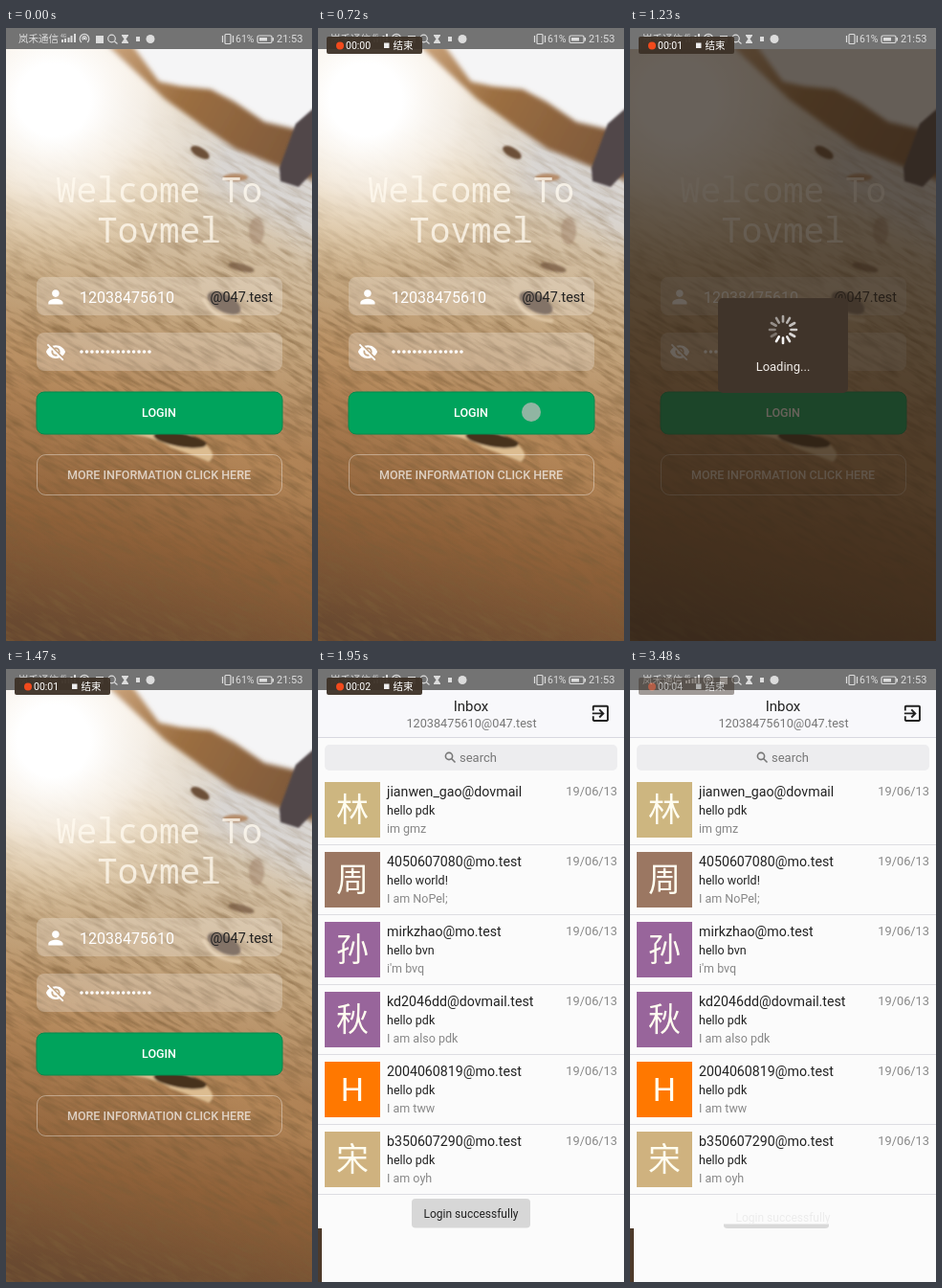
These frames come from a looping animation (320x640 px, 3.51 s). An HTML page:

```html
<!DOCTYPE html>
<html lang="en">
<head>
<meta charset="utf-8">
<title>Mail login</title>
<style>
  html, body { margin: 0; width: 100%; height: 100%; overflow: hidden; background: #fafafa; }
  svg { display: block; width: 320px; height: 640px; font-family: Roboto, "Noto Sans CJK SC", "Noto Sans CJK", sans-serif; }
  .mid { text-anchor: middle; }
  .end { text-anchor: end; }
  .mono { font-family: "Noto Sans Mono", monospace; }
</style>
</head>
<body>
<svg viewBox="0 0 320 640">
  <defs>
    <linearGradient id="sand" gradientUnits="userSpaceOnUse" x1="220" y1="70" x2="90" y2="640">
      <stop offset="0" stop-color="#e6e0da"/>
      <stop offset=".2" stop-color="#d8c8b0"/>
      <stop offset=".4" stop-color="#c5a780"/>
      <stop offset=".6" stop-color="#ad8054"/>
      <stop offset=".8" stop-color="#8f6139"/>
      <stop offset="1" stop-color="#694930"/>
    </linearGradient>
    <linearGradient id="hill" gradientUnits="userSpaceOnUse" x1="110" y1="22" x2="300" y2="130">
      <stop offset="0" stop-color="#c9a27a"/>
      <stop offset=".4" stop-color="#9c6f42"/>
      <stop offset="1" stop-color="#805a3a"/>
    </linearGradient>
    <radialGradient id="glare" gradientUnits="userSpaceOnUse" cx="50" cy="75" r="190">
      <stop offset=".2" stop-color="#fff"/>
      <stop offset=".5" stop-color="#fdf6ec" stop-opacity=".75"/>
      <stop offset="1" stop-color="#f6dcb0" stop-opacity="0"/>
    </radialGradient>
    <linearGradient id="grainFade" x2="0" y2="1">
      <stop offset=".1" stop-color="#000"/>
      <stop offset=".5" stop-color="#fff"/>
    </linearGradient>
    <mask id="ground"><rect width="320" height="640" fill="url(#grainFade)"/></mask>
    <filter id="grain" x="0" y="0" width="100%" height="100%">
      <feTurbulence type="fractalNoise" baseFrequency=".035 .22" numOctaves="3" seed="4"/>
      <feColorMatrix values="0 0 0 0 .2  0 0 0 0 .11  0 0 0 0 .04  2.4 0 0 0 -1"/>
    </filter>
    <filter id="crisp" x="-30%" y="-30%" width="160%" height="160%"><feGaussianBlur stdDeviation="1.3"/></filter>
    <filter id="soft" x="-30%" y="-30%" width="160%" height="160%"><feGaussianBlur stdDeviation="2.5"/></filter>
    <filter id="softer" x="-30%" y="-30%" width="160%" height="160%"><feGaussianBlur stdDeviation="14"/></filter>
    <clipPath id="stage"><rect y="22" width="320" height="618"/></clipPath>
  </defs>

  <g clip-path="url(#stage)">
    <g id="login">
      <rect width="320" height="640" fill="url(#sand)"/>
      <path d="M140 60L340 150V235L200 160L60 80Z" fill="#d9d6d3" filter="url(#softer)"/>
      <path d="M-20 300L340 470V520L-20 340Z" fill="#c49765" opacity=".35" filter="url(#softer)"/>
      <g mask="url(#ground)">
        <rect x="-220" y="-100" width="760" height="900" transform="rotate(30 160 320)" filter="url(#grain)" opacity=".6"/>
      </g>
      <rect width="320" height="320" fill="url(#glare)"/>
      <path d="M92 10H340V125L280 110L235 74L160 60Z" fill="#f5f5f6" filter="url(#soft)"/>
      <path d="M106 18H132L160 56L183 61L214 64L240 78L270 98L330 112V162L284 144L240 126L205 102L166 74Z" fill="url(#hill)" filter="url(#soft)"/>
      <g filter="url(#crisp)" fill="#6c4f38">
        <path d="M303 100L326 80V145L306 166L287 160L286 146Z" fill="#51474a"/>
        <ellipse cx="203" cy="130" rx="11" ry="5" transform="rotate(30 203 130)"/>
        <ellipse cx="240" cy="156" rx="13" ry="4" fill="#b58d6c"/>
        <ellipse cx="262" cy="212" rx="8" ry="14" fill="#a08168" opacity=".5"/>
        <ellipse cx="246" cy="250" rx="14" ry="4" opacity=".7" transform="rotate(15 246 250)"/>
        <path d="M206 282Q216 304 246 306" fill="none" stroke="#dcc3a0" stroke-width="4"/>
        <ellipse cx="228" cy="287" rx="19" ry="9" fill="#5c4738" transform="rotate(28 228 287)"/>
        <path d="M118 422Q160 428 172 438Q196 446 212 453Q222 446 208 434L190 422Z" fill="#dcbc90"/>
        <ellipse cx="182" cy="430" rx="28" ry="7" fill="#46321f" transform="rotate(10 182 430)"/>
      </g>

      <g class="mono mid" font-size="36" fill="#fffaf0" fill-opacity=".78">
        <text x="160" y="182">Welcome To</text>
        <text x="160" y="224">Tovmel</text>
      </g>
      <g fill="#fff" fill-opacity=".24">
        <rect x="32" y="260" width="257" height="40" rx="8"/>
        <rect x="32" y="318" width="257" height="40" rx="8"/>
      </g>
      <g fill="#fff">
        <path transform="translate(40.500 269.500) scale(.95)" d="M12 12c2.21 0 4-1.79 4-4s-1.79-4-4-4-4 1.79-4 4 1.79 4 4 4zm0 2c-2.67 0-8 1.34-8 4v2h16v-2c0-2.66-5.33-4-8-4z"/>
        <path transform="translate(41 327) scale(.92)" d="M12 7c2.76 0 5 2.24 5 5 0 .65-.13 1.26-.36 1.83l2.92 2.92c1.51-1.26 2.7-2.89 3.43-4.75-1.73-4.39-6-7.5-11-7.5-1.4 0-2.74.25-3.98.7l2.16 2.16C10.74 7.13 11.35 7 12 7zM2 4.27l2.74 2.74C3.08 8.3 1.78 10.02 1 12c1.73 4.39 6 7.5 11 7.5 1.55 0 3.03-.3 4.38-.84L19.73 22 21 20.73 3.27 3zM7.53 9.8l1.55 1.55c-.05.21-.08.43-.08.65 0 1.66 1.34 3 3 3 .22 0 .44-.03.65-.08l1.55 1.55c-.67.33-1.41.53-2.2.53-2.76 0-5-2.24-5-5 0-.79.2-1.53.53-2.2zm4.31-.78l3.15 3.15.02-.16c0-1.66-1.34-3-3-3z"/>
        <text x="77" y="287" font-size="16">12038475610</text>
      </g>
      <text class="end" x="279" y="286" font-size="14.4" fill="#222">@047.test</text>
      <path d="M79 338H150.500" stroke="#fff" stroke-width="3.6" stroke-linecap="round" stroke-dasharray="0 5.46"/>
      <rect x="32" y="380" width="257" height="44" rx="8" fill="#00a35c" stroke="#008a4e"/>
      <rect x="32.500" y="445.500" width="256" height="42" rx="9" fill="none" stroke="#fff" stroke-opacity=".38"/>
      <g class="mid" font-size="12.5" font-weight="500" fill="#fff">
        <text x="160" y="406">LOGIN</text>
        <text x="160" y="471" fill-opacity=".68">MORE INFORMATION CLICK HERE</text>
      </g>
      <circle id="touch" cx="223" cy="401" r="10" fill="#a9b8ae"/>
      <g id="loading">
        <rect width="320" height="640" fill="#281e14" opacity=".7"/>
        <rect x="92" y="282" width="136" height="99" rx="5" fill="#40342a"/>
        <g id="spinner" transform="translate(160 315)" stroke="#fff" stroke-width="2.6" stroke-linecap="round"></g>
        <text class="mid" x="160" y="358" font-size="13" fill="#f0ece8">Loading...</text>
      </g>
    </g>

    <g id="inbox">
      <rect width="320" height="640" fill="#fbfbfb"/>
      <rect width="320" height="71" fill="#f8f8fb"/>
      <path d="M0 71.500H320" stroke="#d8d8e0"/>
      <text class="mid" x="160" y="44" font-size="15" fill="#222">Inbox</text>
      <text class="mid" x="160.500" y="61" font-size="12.7" fill="#777">12038475610@047.test</text>
      <path transform="translate(284 35) scale(.95)" fill="#222" d="M10.09 15.59L11.5 17l5-5-5-5-1.41 1.41L12.67 11H3v2h9.67zM19 3H5c-1.11 0-2 .9-2 2v4h2V5h14v14H5v-4H3v4c0 1.1.89 2 2 2h14c1.1 0 2-.9 2-2V5c0-1.1-.9-2-2-2z"/>
      <rect x="7" y="79" width="306" height="27" rx="5" fill="#ededef"/>
      <g fill="none" stroke="#777" stroke-width="1.6"><circle cx="137" cy="91" r="3.6"/><path d="M139.500 93.500L143.500 97.500"/></g>
      <text x="148" y="97" font-size="13" fill="#777">search</text>
      <g id="rows"></g>
      <rect id="edge" y="584" width="4" height="56" fill="#4d3a2a"/>
    </g>
  </g>

  <g id="toast">
    <rect x="98" y="553" width="124" height="30.500" rx="4" fill="#d7d7d7"/>
    <text class="mid" x="160" y="573" font-size="12" fill="#222">Login successfully</text>
  </g>
  <g id="ghost">
    <path d="M98 579.500H208V581Q208 584 204 584H102Q98 584 98 581Z" fill="#d9d9d9"/>
    <text class="mid" x="160" y="577" font-size="12" fill="#ececec">Login successfully</text>
  </g>

  <g fill="#dcdcdc" font-size="10.500">
    <rect width="320" height="22" fill="#737373"/>
    <text x="13" y="15">岚禾通信</text>
    <text x="57" y="10" font-size="5">4G</text>
    <path d="M58 15v-3h2v3zM61 15v-4h2v4zM64.500 15v-5h2v5zM67.500 15v-7h2v7zM71 15v-9h2v9z"/>
    <rect x="94" y="8" width="8" height="8"/>
    <g fill="none" stroke="#dcdcdc" stroke-width="1.2">
      <path d="M79 15a4.800 4.800 0 1 1 6 0M80.500 12.500a2.200 2.200 0 1 1 3 0"/>
      <circle cx="110.500" cy="11" r="3.800"/><path d="M113.500 14l3 2.500"/>
      <rect x="229" y="6.500" width="6" height="10" rx="1"/>
      <path d="M226.500 8v7M237.500 8v7"/>
      <rect x="263" y="8" width="15" height="7.500" rx="1.500"/>
    </g>
    <circle cx="82" cy="11" r="1.200"/>
    <path d="M121 7h7v1l-2.500 3.500 2.500 3.500v1h-7v-1l2.500-3.500-2.500-3.500z"/>
    <rect x="136" y="9" width="4" height="5"/>
    <circle cx="151" cy="11.500" r="4.500"/>
    <path d="M265 10h8v3.500h-8zM278.500 10h1.500v3.500h-1.500z"/>
    <text x="240" y="15">61%</text>
    <text x="283" y="15" font-size="11">21:53</text>
  </g>

  <g id="recorder" font-size="10.500" fill="#fff">
    <rect x="9" y="9" width="100" height="18" rx="2" fill="#3d3126" opacity=".95"/>
    <circle id="dot" cx="23" cy="18.500" r="4" fill="#f24a1c"/>
    <text id="counter" x="29" y="22"></text>
    <rect x="69" y="15.500" width="5.500" height="5.500" fill="#eee"/>
    <text x="78.500" y="22">结束</text>
  </g>
</svg>
<script>
const LOOP = 3510, SECOND = 750;
const $ = id => document.getElementById(id);
const clamp = v => Math.max(0, Math.min(1, v));
const ramp = (t, from, to) => clamp((t - from) / (to - from));
const pulse = (t, inA, inB, outA, outB) => ramp(t, inA, inB) * (1 - ramp(t, outA, outB));
const fade = (id, alpha) => $(id).setAttribute('opacity', alpha);
const shift = (id, x) => $(id).setAttribute('transform', `translate(${x} 0)`);

const mails = [
  ['林', '#cdb680', 'jianwen_gao@dovmail', 'hello pdk', 'im gmz'],
  ['周', '#9b7762', '4050607080@mo.test', 'hello world!', 'I am NoPel;'],
  ['孙', '#98659b', 'mirkzhao@mo.test', 'hello bvn', "i'm bvq"],
  ['秋', '#98659b', 'kd2046dd@dovmail.test', 'hello pdk', 'I am also pdk'],
  ['H', '#ff7800', '2004060819@mo.test', 'hello pdk', 'I am tww'],
  ['宋', '#cfb27f', 'b350607290@mo.test', 'hello pdk', 'I am oyh'],
];
$('rows').innerHTML = mails.map(([letter, color, sender, subject, body], i) => `
  <g transform="translate(0 ${Math.round(110 + 72.9 * i)})">
    <rect x="7" y="8" width="58" height="58" fill="${color}"/>
    <text class="mid" x="36" y="49" font-size="34" fill="#fffdf0">${letter}</text>
    <text x="72" y="23" font-size="14.2" fill="#222">${sender}</text>
    <text x="72" y="42" font-size="12.5" fill="#222">${subject}</text>
    <text x="72" y="61" font-size="12.5" fill="#888">${body}</text>
    <text class="end" x="313" y="22" font-size="12.8" fill="#888">19/06/13</text>
    <path d="M0 73.5H320" stroke="#dddde2"/>
  </g>`).join('');

const spokes = 12;
$('spinner').innerHTML = Array.from({ length: spokes }, (_, i) =>
  `<path d="M0 -8.5V-14" transform="rotate(${i * 360 / spokes})"/>`).join('');

function draw(t) {
  fade('touch', 0.85 * pulse(t, 570, 660, 750, 840));
  fade('loading', pulse(t, 810, 930, 1290, 1440));
  const head = Math.floor(t / (SECOND / spokes));
  [...$('spinner').children].forEach((spoke, i) =>
    spoke.setAttribute('opacity', 1 - 0.75 * ((head - i + spokes * 10) % spokes) / spokes));

  const slide = 1 - (1 - ramp(t, 1520, 1920)) ** 4;
  shift('login', -96 * slide);
  shift('inbox', 320 * (1 - slide));
  fade('edge', t >= 1920 ? 1 : 0);

  fade('toast', pulse(t, 1590, 1770, 2480, 2800));
  fade('ghost', ramp(t, 2640, 2800));

  const clock = t - 30;
  fade('recorder', pulse(t, 30, 120, 3390, 3570));
  $('counter').textContent = '00:0' + Math.max(0, Math.floor(clock / SECOND));
  const phase = (clock + SECOND) % SECOND;
  fade('dot', clock < SECOND || phase >= 240 ? 1 : 1 - ramp(phase, 0, 60));
}

function tick() {
  draw(performance.now() % LOOP);
  requestAnimationFrame(tick);
}
tick();
</script>
</body>
</html>
```
